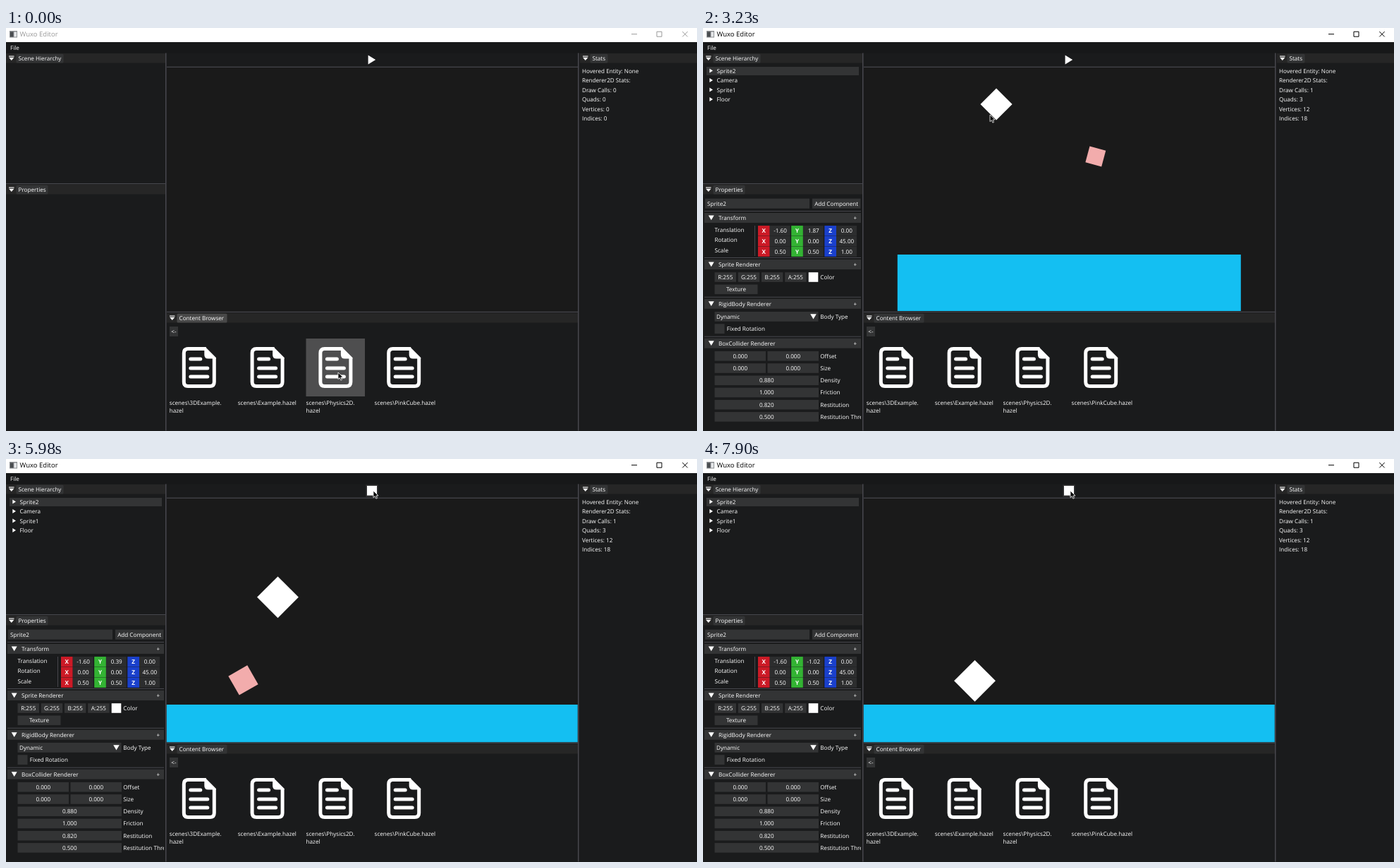
These frames come from a looping animation (980x571 px, 7.93 s). An HTML page:

```html
<!DOCTYPE html>
<html lang="en">
<head>
<meta charset="utf-8">
<title>Wuxo Editor</title>
<style>
  html, body { margin: 0; width: 100%; height: 100%; overflow: hidden; background: #1a1b1c; }
  svg { display: block; width: 980px; height: 571px; }
  text { font: 8.13px "Open Sans", "Noto Sans", sans-serif; fill: #fff; text-rendering: geometricPrecision; white-space: pre; }
  .title { font-size: 9.5px; fill: inherit; }
  .bold { font-weight: 700; }
</style>
</head>
<body>
<svg id="stage" viewBox="0 0 980 571" xmlns="http://www.w3.org/2000/svg"></svg>
<script>
const LOOP = 7930;
const BG = '#1a1b1c', BAR = '#262626', FRAME = '#333435', LINE = '#47474d';

// ---- markup helpers: text is placed by the middle of its capitals ----
const rect = (x, y, w, h, fill, extra = '') =>
  `<rect x="${x}" y="${y}" width="${w}" height="${h}" fill="${fill}" ${extra}/>`;
const text = (x, y, s, extra = '') => `<text x="${x}" y="${y + 2.9}" ${extra}>${s}</text>`;
const mid = (x, y, s, extra = '') => text(x, y, s, `text-anchor="middle" ${extra}`);
const poly = (pts, fill = '#fff', extra = '') => `<polygon points="${pts}" fill="${fill}" ${extra}/>`;
const group = (id, body, extra = '') => `<g id="${id}" ${extra}>${body}</g>`;
const down = (x, y, r = 4) => poly(`${x - r},${y - r * .8} ${x + r},${y - r * .8} ${x},${y + r * .9}`);
const field = (x, y, w, s, h = 13.6) => rect(x, y - h / 2, w, h, FRAME) + mid(x + w / 2, y, s);

function tabBar(x, y, w, name, tabW, id) {
  return rect(x, y, w, 13.5, BAR)
    + rect(x + 4, y + 3.5, 7.5, 1.1, '#fff')
    + poly(`${x + 4},${y + 5.8} ${x + 11.5},${y + 5.8} ${x + 7.75},${y + 10}`)
    + rect(x + 14.5, y + .8, tabW, 12.7, FRAME, `rx="1.5" id="${id}"`)
    + text(x + 17.5, y + 7, name);
}

function fileIcon(x, y) {
  const lines = [[19, 17], [29, 30], [29, 42]]
    .map(([w, dy]) => `M${x + 12} ${y + dy}h${w - 5}`).join('');
  return `<path d="M${x + 34} ${y + 2.5}H${x + 8.5}q-6 0-6 6V${y + 49.5}q0 6 6 6H${x + 39.5}q6 0 6-6V${y + 15}" fill="none" stroke="#fff" stroke-width="5"/>`
    + `<path d="M${x + 33} ${y}L${x + 48} ${y + 15}V${y + 16.5}H${x + 37}q-5.5 0-5.5-5.5V${y}Z" fill="#fff"/>`
    + `<path d="${lines}" stroke="#fff" stroke-width="5" stroke-linecap="round"/>`;
}

function titleBar() {
  return rect(0, 0, 980, 20, '#fff')
    + rect(5, 4, 11, 9.5, '#8a8d90') + rect(6, 5.5, 4.5, 7, '#4a4d50') + rect(11.3, 5.5, 3.8, 7, '#e4e6e8')
    + group('chrome', `<text class="title" x="19.5" y="12.4">Wuxo Editor</text>`
      + `<path d="M887 8.7h8M923 5.2h7v7h-7zM959.3 5l7.4 7.4M966.7 5l-7.4 7.4" fill="none" stroke="currentColor" stroke-width="1"/>`)
    + rect(0, 20, 980, 15.5, '#171819') + text(6, 28.3, 'File');
}

function hierarchy() {
  const rows = ['Sprite2', 'Camera', 'Sprite1', 'Floor'].map((name, i) => {
    const y = 61 + i * 13.5;
    return poly(`9.3,${y - 3.4} 14,${y - .5} 9.3,${y + 2.4}`) + text(19.5, y, name);
  }).join('');
  return group('rows', rect(5, 55, 216, 12, FRAME, 'id="picked"') + rows);
}

function header(y, name) {
  return rect(2, y - 10, 222, 1, LINE) + rect(2, y - 7, 222, 14, FRAME)
    + down(11.7, y - .3) + text(22, y, name) + mid(215.8, y, '+');
}

function properties() {
  const axes = [['X', 78, '#cc1a26'], ['Y', 125.2, '#33b333'], ['Z', 172.3, '#1a40cc']];
  const vectors = [['Translation', '-1.60', '1.87', '0.00'],
    ['Rotation', '0.00', '0.00', '45.00'], ['Scale', '0.50', '0.50', '1.00']];
  let s = rect(3, 241.7, 148, 14, FRAME) + text(6, 248.7, 'Sprite2')
    + rect(155, 241.7, 68.5, 14, FRAME) + mid(189.2, 248.7, 'Add Component')
    + header(269, 'Transform') + rect(73, 280, 1, 43, LINE);
  vectors.forEach(([name, ...vals], i) => {
    const y = 287.4 + i * 14.7;
    s += text(16.5, y - 1.6, name);
    axes.forEach(([axis, x, color], k) => {
      const id = !i && k == 1 ? 'id="posY"' : '';
      s += rect(x, y - 7.3, 16.7, 14.4, color) + mid(x + 8.3, y, axis, 'class="bold"')
        + rect(x + 16.7, y - 7.3, 29, 14.4, '#2c2d2e') + mid(x + 31.5, y, vals[k], id);
    });
  });
  s += header(335, 'Sprite Renderer');
  ['R', 'G', 'B', 'A'].forEach((c, i) => s += field(16.5 + i * 33.2, 353, 30.5, c + ':255'));
  s += rect(149.7, 346.2, 13.6, 13.6, '#fff') + text(166.3, 353, 'Color')
    + field(16.5, 370.3, 61, 'Texture')
    + header(390.8, 'RigidBody Renderer')
    + rect(16.5, 402, 147, 13.8, FRAME) + text(19, 409, 'Dynamic') + down(156.5, 408.7, 4.3) + text(166.3, 409, 'Body Type')
    + rect(16.5, 419.3, 14, 13.8, FRAME) + text(33.8, 426.3, 'Fixed Rotation')
    + header(446.7, 'BoxCollider Renderer');
  ['Offset', 'Size'].forEach((name, i) => {
    const y = 464.8 + i * 17.2;
    s += field(16.5, y, 72.5, '0.000') + field(91.5, y, 72.5, '0.000') + text(166.3, y, name);
  });
  [['Density', '0.880'], ['Friction', '1.000'], ['Restitution', '0.820'], ['Restitution Threshold', '0.500']]
    .forEach(([name, v], i) => {
      const y = 499.3 + i * 17.2;
      s += field(16.5, y, 147.5, v) + text(166.3, y, name);
    });
  return group('props', s, 'clip-path="url(#leftClip)"');
}

function browser() {
  const files = [['scenes\\3DExample.', 'hazel'], ['scenes\\Example.hazel'],
    ['scenes\\Physics2D.', 'hazel'], ['scenes\\PinkCube.hazel']];
  return tabBar(228, 404, 583, 'Content Browser', 71, 'filesTab')
    + rect(232, 423, 12, 14, FRAME) + mid(238, 430.3, '&lt;-')
    + rect(425.5, 440, 83.5, 82, '#4e4e4f', 'id="tile"')
    + files.map((lines, i) => fileIcon(249.8 + i * 96.8, 452)
      + lines.map((l, k) => text(231.8 + i * 96.9, 531 + k * 11, l)).join('')).join('');
}

const stats = ['Hovered Entity: None', 'Renderer2D Stats:', 'Draw Calls: 0', 'Quads: 0', 'Vertices: 0', 'Indices: 0'];
const square = id => `<rect id="${id}" x="-.5" y="-.5" width="1" height="1" fill="${id == 'pink' ? '#f2acac' : '#fff'}"/>`;

document.getElementById('stage').innerHTML =
  `<defs><clipPath id="viewClip"><rect x="227.7" y="56" width="583" height="345.3"/></clipPath>
   <clipPath id="leftClip"><rect x="0" y="236" width="224" height="330"/></clipPath></defs>`
  + rect(0, 0, 980, 571, BG) + titleBar()
  + tabBar(0, 36, 226, 'Scene Hierarchy', 67, 'treeTab') + hierarchy()
  + tabBar(0, 222, 226, 'Properties', 45, 'propTab') + properties()
  + rect(228, 56, 583, 346, '#1a1a1a')
  + group('scene', rect(0, 0, 0, 0, '#14bff2', 'id="floor"') + square('pink') + square('white'), 'clip-path="url(#viewClip)"')
  + browser()
  + tabBar(814, 36, 166, 'Stats', 25, 'statsTab')
  + stats.map((s, i) => text(817, 61 + i * 13.5, s, `id="stat${i}"`)).join('')
  + rect(0, 220, 226, 1.2, LINE) + rect(228, 54.7, 583, 1.2, LINE) + rect(228, 401.8, 583, 1.2, LINE)
  + rect(226, 35.5, 1.5, 535, LINE) + rect(811, 35.5, 1.5, 535, LINE)
  + rect(510.5, 36.5, 17, 17, '#343435', 'id="hover"')
  + poly('513.6,38.6 524.2,45 513.6,51.4', '#fff', 'id="play"')
  + rect(512, 38, 14, 13.6, '#fff', 'id="stop"')
  + `<path id="cursor" d="M0 0V9.6L2.2 7.6L3.9 11.2L5.5 10.4L3.9 7H7Z" fill="#000" stroke="#fff" stroke-width=".8"/>`;

const el = {};
document.querySelectorAll('[id]').forEach(n => el[n.id] = n);
const show = (n, on) => n.setAttribute('visibility', on ? 'visible' : 'hidden');
const put = (n, s) => { if (n.textContent !== s) n.textContent = s; };

// ---- motion ----
const LOADED = 700, PICKED = 1500, PLAYED = 4470;
const path = [ // ms, x, y of the pointer
  [0, 471, 488], [120, 471, 487], [700, 436, 262], [900, 430, 240], [1300, 410, 128], [1390, 409, 124],
  [1500, 406, 112], [1640, 401, 102], [1710, 401, 102], [1740, 409, 107], [1940, 409, 107], [2060, 403, 128],
  [3200, 403, 128], [3230, 407, 123], [3290, 409, 118], [3660, 409, 118], [4120, 518, 46], [4620, 518, 46],
  [5050, 479, 168], [5330, 479, 168], [5900, 521, 45], [LOOP, 521, 45]];

function pointer(t) {
  const i = Math.max(1, path.findIndex(p => p[0] >= t));
  const [a, b] = [path[i - 1], path[i]];
  const u = (t - a[0]) / (b[0] - a[0]), e = u * u * (3 - 2 * u);
  return [a[1] + (b[1] - a[1]) * e, a[2] + (b[2] - a[2]) * e];
}

const REST = -1.074, DROP = 4.49, G = 12.85, UNIT = 83.6;
const hop = (list, s) => { // height of a bounce: start, length, peak
  const h = list.find(([a, d]) => s >= a && s < a + d);
  if (!h) return 0;
  const u = (s - h[0]) / h[1];
  return 4 * h[2] * u * (1 - u);
};
const bounces = [[5.167, 1.112, 1.87], [6.279, .911, 1.3], [7.19, .722, .825]];
const fallen = s => G / 2 * Math.max(0, s - DROP) ** 2;

const whiteY = s => s < 5.167 ? Math.max(REST, 1.87 - fallen(s)) : REST + hop(bounces, s);

function pinkPose(s) {
  if (s < 5.037) return [568, 168.3 + fallen(s) * UNIT, 15];
  if (s < 5.4) {
    const d = s - 5.037;
    return [568 - 174 * d, 329 - 203 * d + 537 * d * d, 15 - 195 * d];
  }
  const d = s - 5.4;
  return [505 - 290 * d, 326 - hop([[5.4, .45, 27], [5.85, .32, 13], [6.17, .32, 13]], s), -55.8 - 420 * d];
}

const place = (n, x, y, a, size) => n.setAttribute('transform', `translate(${x} ${y}) rotate(${a}) scale(${size})`);
const box = (n, ...v) => ['x', 'y', 'width', 'height'].forEach((k, i) => n.setAttribute(k, v[i]));

function draw(t) {
  const s = t / 1000, loaded = t >= LOADED, picked = t >= PICKED, playing = t >= PLAYED;
  const [cx, cy] = pointer(t);
  el.cursor.setAttribute('transform', `translate(${cx} ${cy})`);

  const ink = t < 60 ? '#999' : '#000';
  el.chrome.setAttribute('fill', ink);
  el.chrome.setAttribute('color', ink);
  show(el.tile, !loaded);
  el.filesTab.setAttribute('fill', picked ? FRAME : '#484848');
  show(el.rows, loaded);
  show(el.picked, picked);
  show(el.props, picked);
  show(el.scene, loaded);

  const over = (t >= 1440 && t < 2000) || (t >= 3260 && t < 3780);
  put(el.stat0, 'Hovered Entity: ' + (over ? 'Sprite2' : 'None'));
  [1, 3, 12, 18].forEach((n, i) => put(el['stat' + (i + 2)], stats[i + 2].replace('0', loaded ? n : 0)));

  show(el.play, !playing);
  show(el.stop, playing);
  show(el.hover, cx > 510 && cx < 528 && cy > 36 && cy < 54);

  const y = whiteY(s);
  put(el.posY, y.toFixed(2));
  if (playing) {
    box(el.floor, 220, 348, 600, 60);
    place(el.white, 385.5, 228.7 - y * UNIT, 45, 41.6);
    place(el.pink, ...pinkPose(s), 31);
  } else {
    box(el.floor, 275.8, 321, 487, 80);
    place(el.white, 416, 108, 45, 31.9);
    place(el.pink, 556.8, 182, 15, 23.6);
  }
}

const start = performance.now();
function tick() {
  draw((performance.now() - start) % LOOP);
  requestAnimationFrame(tick);
}
tick();
</script>
</body>
</html>
```
